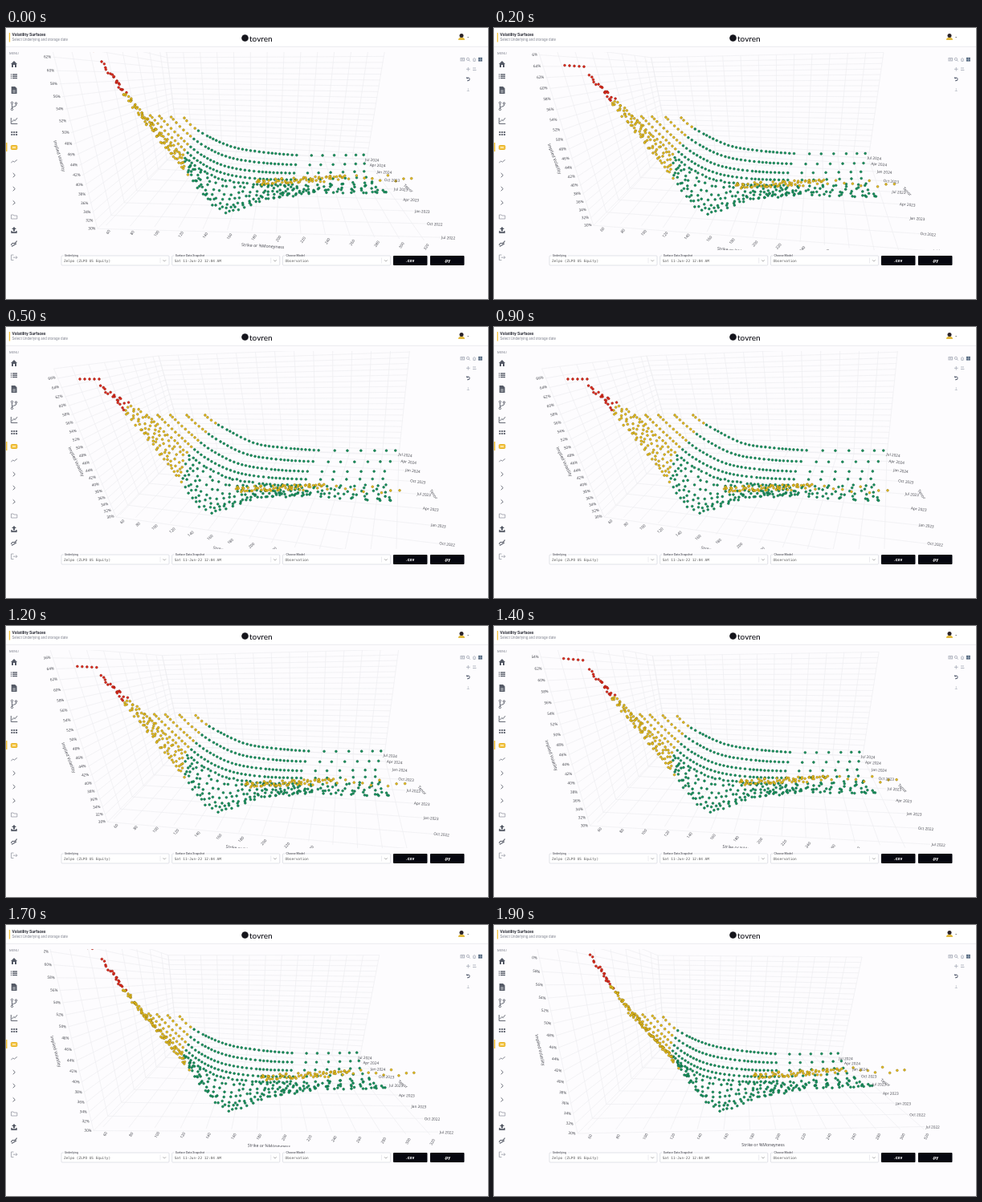
Recreate the animation shown at these times as an HTML page with a canvas. Size 600 px wide and 338 px high, loop 2000 ms.

```html
<!DOCTYPE html>
<html lang="en">
<head>
<meta charset="utf-8">
<title>Volatility Surfaces</title>
<style>
  html, body { margin: 0; width: 100%; height: 100%; overflow: hidden; background: #fdfcfe; }
  svg, canvas { position: absolute; left: 0; top: 0; width: 600px; height: 338px; }
  text { font-family: Roboto, sans-serif; fill: #30323c; }
  .mono { font: 4.4px "DejaVu Sans Mono", monospace; fill: #555; }
  .tiny { font-size: 3.6px; }
  .icon { fill: none; stroke: #666a75; stroke-width: 1; }
  .solid { fill: #555a66; stroke: none; }
</style>
</head>
<body>
<svg viewBox="0 0 600 338">
  <rect width="600" height="23" fill="#fff"/>
  <path d="M0 23.3H600" stroke="#e6e6ec" stroke-width=".8"/>
  <rect x="3.8" y="6" width="1.3" height="11.5" fill="#f5c542"/>
  <text x="7.5" y="10.4" font-size="5.1" font-weight="700">Volatility Surfaces</text>
  <text x="7.5" y="16" font-size="4.5" style="fill:#858894">Select Underlying and storage date</text>
  <circle cx="297.5" cy="12.5" r="4.3" fill="#15151c"/>
  <text x="303" y="17" font-size="10" font-weight="500" style="font-family:Lato,sans-serif;fill:#15151c">tovren</text>
  <path d="M563 15q0-3.2 4-3.2t4 3.2z" fill="#e0b83c"/>
  <circle cx="567" cy="9.6" r="2.5" fill="#2b2328"/>
  <path d="M574 11h2.4l-1.2 1.3z" fill="#777"/>
  <text x="4" y="32.5" font-size="4.2" style="fill:#888b96">MENU</text>
  <rect y="143" width="1.5" height="11" fill="#f5c542"/>

  <g class="icon">
    <path class="solid" d="M6 45l4-4 4 4h-1v4h-2v-3H9v3H7v-4z"/>
    <path d="M6 58h1M8 58h6M6 60.3h1M8 60.3h6M6 62.6h1M8 62.6h6" stroke-width="1.5"/>
    <path class="solid" d="M6.7 73h4.5l2.3 2.3v6.7H6.7z"/>
    <path d="M8.3 78h3.5M8.3 80h3.5" stroke="#fff" stroke-width=".7"/>
    <path d="M7.5 94v7M12.5 95v2l-5 2.2"/>
    <circle cx="7.5" cy="93.3" r="1.2"/><circle cx="12.5" cy="94" r="1.2"/><circle cx="7.5" cy="101.5" r="1.2"/>
    <path d="M6.3 112v7.5h8M7.5 117l2.3-2.5 1.4 1.2 2.8-3.5"/>
    <path d="M6.3 130h8M6.3 133h8" stroke-width="2" stroke-dasharray="2 .9"/>
    <rect x="6.3" y="146.5" width="7.5" height="5" rx="1" fill="#f5c542" stroke="#e5b022"/>
    <path d="M8 149h4" stroke="#fff"/>
    <path d="M6.3 168l2.5-2 1.5 1.2 3.5-2.8" stroke="#8a8d98"/>
    <path d="M8.7 181l2.6 2.6-2.6 2.6M8.7 198l2.6 2.6-2.6 2.6M8.7 215.3l2.6 2.6-2.6 2.6"/>
    <path d="M6.5 233h2.7l.8 1h3.8v4H6.5z" stroke="#8a8d98" stroke-width=".7"/>
    <path class="solid" d="M10 248l3 3h-2v2.5H9V251H7zM6.3 253h1.5v1.2h4.4V253h1.5v3H6.3z"/>
    <path d="M6.5 271q1-3.5 3-2.5t4-3M7 272.5l6-3.5" stroke-width="1.2"/>
    <path d="M9.5 283h-3v6.5h3M9 286.2h5M12.3 284.5l1.7 1.7-1.7 1.7" stroke="#999ca6" stroke-width=".8"/>
  </g>
  <g class="icon" stroke-width=".8" style="stroke:#b3b7c2">
    <rect x="566" y="37.5" width="4.5" height="3.4"/><circle cx="568.2" cy="39.2" r=".7"/>
    <circle cx="575" cy="38.8" r="1.6"/><path d="M576.2 40l1.5 1.6"/>
    <path d="M581 39.3l2-1.8 2 1.8M581.8 39v2.4h2.4V39"/>
    <path d="M573 51.3h4.6M575.3 49v4.6M581 50h4M581 52.5h4.4"/>
    <path d="M575.3 75v4M573.7 78.5h3.2" stroke-width=".6"/>
    <path d="M573.7 62.6q3-1.6 3.4 1t-3 2.2M573.7 61.3v1.5h1.5" style="stroke:#4c5568"/>
  </g>
  <rect x="588" y="36.8" width="4.8" height="4.8" fill="#4c6078"/>
  <path d="M588 39.2h4.8M590.4 36.8v4.8" stroke="#c4d0dc" stroke-width=".5"/>

  <g id="selects"></g>
  <rect x="482" y="284" width="42.5" height="12" rx="1" fill="#06070f"/>
  <rect x="528" y="284" width="42.5" height="12" rx="1" fill="#06070f"/>
  <g font-size="5.6" font-weight="700" text-anchor="middle">
    <text x="503.2" y="292" style="fill:#fff">.csv</text>
    <text x="549.2" y="292" style="fill:#fff">.py</text>
  </g>
</svg>
<canvas id="plot"></canvas>
<script>
const LOOP = 2000, STEP = 100;
const canvas = document.getElementById('plot');
const ctx = canvas.getContext('2d');
const dpr = window.devicePixelRatio || 1;
canvas.width = 600 * dpr;
canvas.height = 338 * dpr;

document.getElementById('selects').innerHTML = [
  [69, 'Underlying', 'Zelpo (ZLPO US Equity)'],
  [206.7, 'Surface Data Snapshot', 'Sat 11-Jun-22 12:04 AM'],
  [344.5, 'Choose Model', 'Observation']
].map(([x, label, value]) => `
  <rect x="${x}" y="284" width="134" height="12" rx="1" fill="#fff" stroke="#cfd0d8" stroke-width=".6"/>
  <rect x="${x + 3}" y="283" width="${label.length * 1.75 + 2}" height="2" fill="#fdfcfe"/>
  <text class="tiny" x="${x + 4}" y="285">${label}</text>
  <text class="mono" x="${x + 3}" y="291.6">${value}</text>
  <path d="M${x + 123} 286.5v7" stroke="#d8d8e0" stroke-width=".5"/>
  <path d="M${x + 126.5} 289.3l1.8 1.8 1.8-1.8" fill="none" stroke="#888" stroke-width=".7"/>`).join('');

let seed = 11;
const random = () => (seed = (seed * 16807) % 2147483647) / 2147483647;
const jitter = size => (random() - 0.5) * 2 * size;
const mix = (a, b, k) => a + (b - a) * k;
const mixPoint = (a, b, k) => a.map((v, i) => mix(v, b[i], k));

// Each point is [x, y] at the left end of the orbit followed by [x, y] at the right end.
const farRow = [[211,115,248,110],[221,126,258,118],[240,138,275,128],[270,150,310,145],
                [310,157,350,151],[360,161,400,154],[430,160,487,154]];
const middleRow = [[168,110,176,110],[200,142,207,140],[232,172,240,169],[262,188,275,187],
                   [305,195,315,195],[365,195,380,198],[450,190,475,197]];
const nearRow = [[120,38,118,74],[160,95,165,125],[225,172,215,188],[275,229,250,230],
                 [330,215,315,213],[400,203,390,211],[470,202,478,218]];

const COLORS = {
  red: ['#e62b1c', '#8d1a12'],
  yellow: ['#efc51c', '#8a7113'],
  green: ['#17965f', '#0c5f3d']
};

const blendRows = (a, b, k) => a.map((p, i) => mixPoint(p, b[i], k));

function spline(row, u) {
  const i = Math.min(Math.floor(u), row.length - 2), t = u - i;
  const at = n => row[Math.max(0, Math.min(row.length - 1, n))];
  const [a, b, c, d] = [at(i - 1), at(i), at(i + 1), at(i + 2)];
  return b.map((v, n) => v + t / 2 * (c[n] - a[n]
    + t * (2 * a[n] - 5 * v + 4 * c[n] - d[n] + t * (3 * (v - c[n]) + d[n] - a[n]))));
}

const dots = [];
const addDot = (point, color, dx = 0, dy = 0) =>
  dots.push({ point: point.map((v, i) => v + (i % 2 ? dy : dx)), color });

function addRow(row, spacing, noise, redEnd, yellowEnd) {
  for (let u = 0; u <= 6.001;) {
    const color = u < redEnd ? 'red' : u < yellowEnd ? 'yellow' : 'green';
    addDot(spline(row, u), color, jitter(noise), jitter(noise));
    const i = Math.min(5, Math.floor(u));
    const length = Math.hypot(row[i + 1][2] - row[i][2], row[i + 1][3] - row[i][3]);
    u += (u < 4.8 ? spacing : 14.5) * (1 + jitter(noise / 6)) / length;
  }
}

for (const k of [0, 0.32, 0.6, 0.82, 1])
  addRow(blendRows(farRow, middleRow, k), 5.2, k > 0.9 ? 0.8 : 0.1, 0, 1.4 + 0.25 * k);
for (const k of [0.2, 0.42, 0.62, 0.78, 0.9, 1])
  addRow(blendRows(middleRow, nearRow, k), 8, 1.7, 0.9 * k - 0.25, 1.65 + 0.45 * k);
for (let i = 0; i < 5; i++) addDot([82 + 6 * i, 19 + i, 92 + 6 * i, 65], 'red');
for (let i = 0; i < 62; i++) {
  const v = i / 61;
  addDot([mix(322, 432, v), 189 - 7 * v, mix(285, 395, v), 203 - 4 * v], 'yellow', jitter(2), jitter(3.6));
}
for (let i = 0; i < 9; i++) {
  const v = i / 8;
  addDot([mix(438, 511, v), 181, mix(400, 490, v), 201 + 3 * v], 'yellow', 0, jitter(4));
}

const strikeTick = i => [120 + 34.8 * i - 0.2 * i * i, 264,
                         145 + 19 * i + 0.57 * i * i, 243 + 3.2 * i + 0.15 * i * i];
const volTick = i => [97 - 2.7 * i - 0.033 * i * i, 260 - 12 * i - 0.173 * i * i,
                      130 - 3.6 * i - 0.025 * i * i, 237 - 7.4 * i - 0.123 * i * i];
const dateTick = i => [438 + 7.2 * i + 0.79 * i * i, 167 + 5.4 * i + 0.66 * i * i,
                       497 + 3.6 * i + 0.55 * i * i, 160 + 7.5 * i + 1.2 * i * i];
const DATES = ['Jul 2024', 'Apr 2024', 'Jan 2024', 'Oct 2023', 'Jul 2023',
               'Apr 2023', 'Jan 2023', 'Oct 2022', 'Jul 2022'];

const backLeft = [212, 150, 222, 150], backRight = [432, 165, 489, 160];
const topLeft = [204, 38, 190, 36], topRight = [458, 40, 503, 24];
const shift = (p, dx, dy) => p.map((v, i) => v + (i % 2 ? dy : dx));

const gridLines = [];
for (let i = 0; i <= 13; i++) {
  const base = mixPoint(backLeft, backRight, i / 13);
  gridLines.push([shift(strikeTick(i), -3, -9), base], [base, mixPoint(topLeft, topRight, i / 13)]);
}
for (let i = 0; i <= 19; i++) {
  const corner = mixPoint(backLeft, topLeft, i / 19);
  gridLines.push([shift(volTick(i), 7, 0), corner], [corner, mixPoint(backRight, topRight, i / 19)]);
}
for (let i = 0; i <= 8; i++) {
  const depth = Math.pow(i / 8, 1.4);
  const left = mixPoint(backLeft, shift(volTick(0), 7, 0), depth);
  gridLines.push([left, shift(dateTick(i), -10, -1)], [left, mixPoint(topLeft, shift(volTick(19), 7, 0), depth)]);
}

// Orbit position over time: drag right, rest, drag back past the start.
const ORBIT = [[0, 0.3], [200, 0.6], [500, 1], [900, 1], [1400, 0.47], [1700, 0.15], [1900, 0]];
function orbitAt(time) {
  const i = Math.max(1, ORBIT.findIndex(key => key[0] >= time));
  const [t0, p0] = ORBIT[i - 1], [t1, p1] = ORBIT[i];
  return mix(p0, p1, (time - t0) / (t1 - t0));
}

function draw(time) {
  const orbit = orbitAt(time);
  const lift = Math.max(0, 1 - time / 200) * 0.0004;
  const project = p => {
    const y = mix(p[1], p[3], orbit);
    return [mix(p[0], p[2], orbit), y - lift * (y - 170) ** 2];
  };
  const label = (text, point, angle, size = 4.7) => {
    ctx.save();
    ctx.translate(...project(point));
    ctx.rotate(angle);
    ctx.font = `${size}px "Open Sans", sans-serif`;
    ctx.fillText(text, 0, 0);
    ctx.restore();
  };

  ctx.setTransform(dpr, 0, 0, dpr, 0, 0);
  ctx.clearRect(0, 0, 600, 338);
  ctx.save();
  ctx.beginPath();
  ctx.rect(47, 30, 521, 247);
  ctx.clip();

  ctx.strokeStyle = '#ebebef';
  ctx.lineWidth = 0.6;
  ctx.beginPath();
  for (const [a, b] of gridLines) {
    ctx.moveTo(...project(a));
    ctx.lineTo(...project(b));
  }
  ctx.stroke();

  ctx.lineWidth = 0.55;
  for (const { point, color } of dots) {
    [ctx.fillStyle, ctx.strokeStyle] = COLORS[color];
    ctx.beginPath();
    ctx.arc(...project(point), 1.4, 0, 7);
    ctx.fill();
    ctx.stroke();
  }

  ctx.fillStyle = '#3c3e46';
  ctx.textAlign = 'center';
  ctx.textBaseline = 'middle';
  for (let i = 0; i <= 18; i++) label(`${30 + 2 * i}%`, volTick(i), mix(0.12, -0.2, orbit));
  for (let i = 0; i <= 13; i++) label(60 + 20 * i, strikeTick(i), mix(-1.1, -0.7, orbit));
  DATES.forEach((text, i) => label(text, dateTick(i), mix(0.02, 0.12, orbit)));
  label('Implied Volatility', [57, 156, 87, 168], mix(1.35, 1.13, orbit), 5.2);
  label('Strike or %Moneyness', [335, 275, 284, 281], mix(0, 0.2, orbit), 5.2);
  label('Tenor', [487, 197, 532, 209], mix(0.6, 0.95, orbit), 5);
  ctx.restore();
}

function frame(now) {
  draw(Math.floor(now % LOOP / STEP) * STEP);
  requestAnimationFrame(frame);
}
requestAnimationFrame(frame);
</script>
</body>
</html>
```
